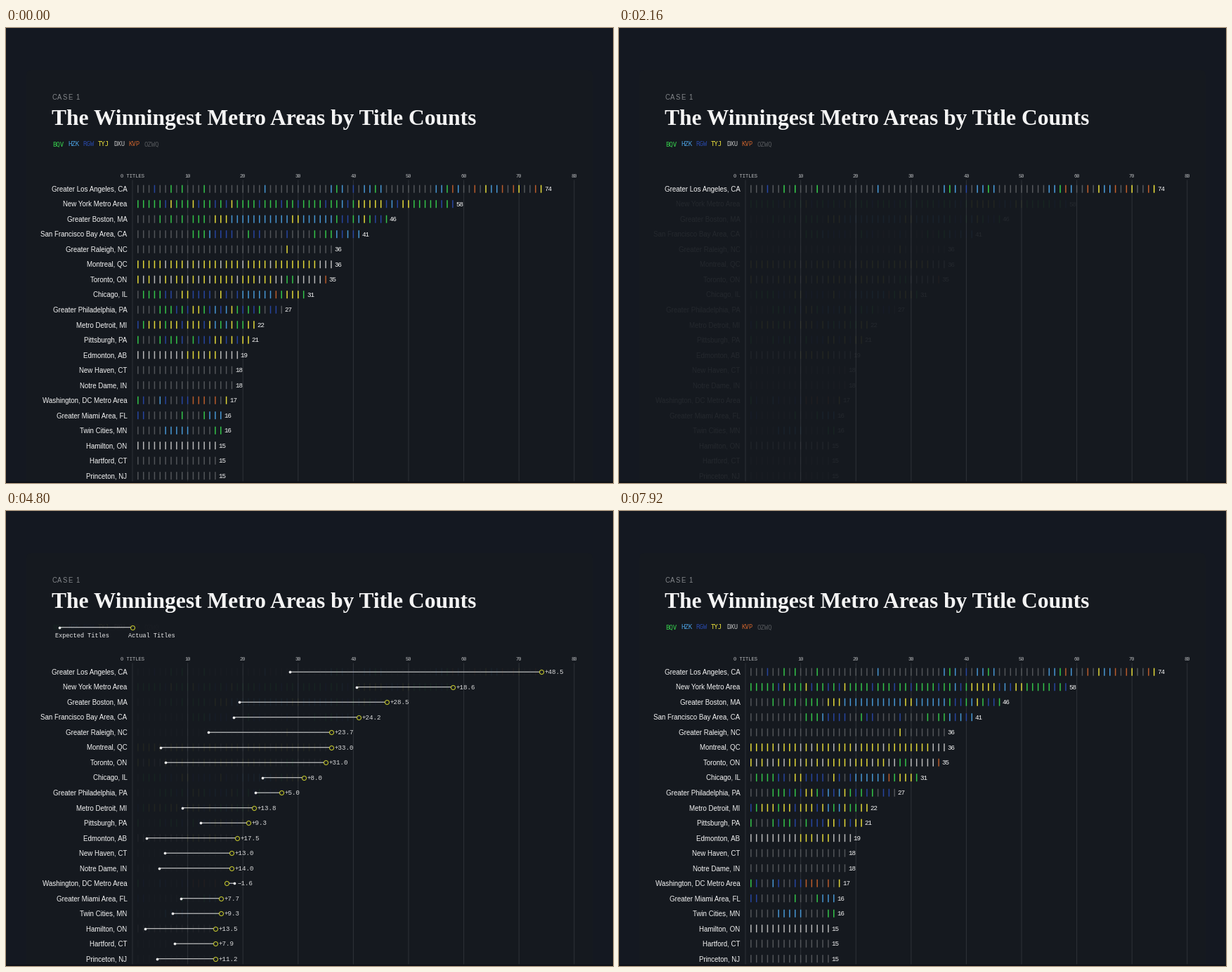
These frames come from a looping animation (864 px wide and 648 px high, 8000 ms). A matplotlib script:

```python
import matplotlib.pyplot as plt
from matplotlib.animation import FuncAnimation
from matplotlib.collections import LineCollection
from matplotlib.patches import FancyBboxPatch, Rectangle

W, H, DPI = 864, 648, 72
STEP_MS, FRAMES = 80, 100
X0, UNIT, Y0, ROW_H, SHOWN = 180, 7.86, 229.2, 21.5, 20
OUTER, PANEL, WHITE, YELLOW = "#141821", "#15191f", "#f4f4f4", "#c9cc2e"
SANS, SERIF, MONO = "Liberation Sans", "Liberation Serif", "Liberation Mono"
DIM = 0.06

LEAGUES = {
    "g": ("BQV", "#36cf4c"), "b": ("HZK", "#4a9fe0"), "n": ("RGW", "#2848a8"),
    "y": ("TYJ", "#f0e53a"), "c": ("DXU", "#c2c2c2"), "m": ("KVP", "#c4602c"),
    ".": ("OZWQ", "#55585c"),
}

# name, titles, titles above expectation, league of each title
METROS = [
    ("Greater Los Angeles, CA", 74, 48.5, "...n..g.g...g..........b...........bgb.n"
     ".bbgb.........bbgmb..m.ybbm.my..my"),
    ("New York Metro Area", 58, 18.6, "gggggnygggynggngnyggggngggnggnggggnggbng"
     "yyyyynbnyygggggngn"),
    ("Greater Boston, MA", 46, 28.5, "....g.g.g.ggg.yyybbbbbbbbbbbyybbbbbbgnngbygnng"),
    ("San Francisco Bay Area, CA", 41, 24.2, "..........gggbnnnn..gnn....n....g.ggbnbnb"),
    ("Greater Raleigh, NC", 36, 23.7, "." * 27 + "y" + "." * 8),
    ("Montreal, QC", 36, 33.0, "yyyyycyyycycyyycyyycyyyycyyyyyyyyccc"),
    ("Toronto, ON", 35, 31.0, "ycyccycyycycycyyyycyyycyyccggcccccm"),
    ("Chicago, IL", 31, 8.0, ".ggggnn.yynnnn.yn.nbbbbbbmgyyyg"),
    ("Greater Philadelphia, PA", 27, 5.0, "....gggngnyygnbnbygngng.nn."),
    ("Metro Detroit, MI", 22, 13.8, "ngyyygyynyyynybgbyggyy"),
    ("Pittsburgh, PA", 21, 9.3, "g...gnggn.gnnnyynynyy"),
    ("Edmonton, AB", 19, 17.5, "cccccccccyyycyycccc"),
    ("New Haven, CT", 18, 13.0, "." * 18),
    ("Notre Dame, IN", 18, 14.0, "." * 18),
    ("Washington, DC Metro Area", 17, -1.6, "gn..bn..nnmmm.m.y"),
    ("Greater Miami Area, FL", 16, 7.7, "nn......g...gbbb"),
    ("Twin Cities, MN", 16, 9.32, ".....bbbbb....gg"),
    ("Hamilton, ON", 15, 13.5, "c" * 15),
    ("Hartford, CT", 15, 7.9, "." * 15),
    ("Princeton, NJ", 15, 11.2, "." * 15),
    ("Tuscaloosa, AL", 15, 11.1, ""),
    ("Green Bay, WI", 14, 11.4, ""),
    ("Austin, TX", 13, 9.0, ""),
    ("Winnipeg, MB", 10, 8.5, ""),
    ("Ottawa, ON", 10, 8.3, ""),
]
BY_MARGIN = sorted(METROS, key=lambda metro: -metro[2])[:SHOWN]

# Each track: (start ms, duration ms, value reached)
CROWD = [(0, 240, 0), (800, 240, 1), (1620, 160, 0), (2120, 360, 1), (2960, 160, 0),
         (3840, 160, 1), (6000, 280, 0), (7020, 500, 1)]
MORPH = [(340, 320, 1), (1760, 320, 0), (3280, 320, 1), (4720, 320, 0),
         (5040, 320, 1), (6340, 440, 0)]
SORT = [(340, 0, 1), (1360, 160, 0.9), (1520, 120, 1), (1800, 0, 0), (3280, 0, 1),
        (4320, 330, 0), (5440, 400, 1), (6330, 0, 0)]


def ease(u):
    return 4 * u ** 3 if u < 0.5 else 1 - 4 * (1 - u) ** 3


def lerp(a, b, u):
    return a + (b - a) * u


def track(segments, t, value):
    for start, length, goal in segments:
        if t >= start + length:
            value = goal
        elif t > start:
            return lerp(value, goal, ease((t - start) / length))
    return value


def x_of(titles):
    return X0 + UNIT * titles


def y_of(rank):
    return Y0 + ROW_H * rank


fig = plt.figure(figsize=(W / DPI, H / DPI), dpi=DPI, facecolor=OUTER)
ax = fig.add_axes([0, 0, 1, 1])
ax.set(xlim=(0, W), ylim=(H, 0))
ax.axis("off")


def write(x, y, text, size, font=MONO, color=WHITE, **kw):
    return ax.text(x, y, text, fontsize=size, family=font, color=color,
                   va="baseline", **kw)


def marker(x, y, size, face, edge, **kw):
    return ax.plot([x], [y], "o", ms=size, mfc=face, mec=edge, mew=1.1,
                   snap=False, **kw)[0]


def draw_dumbbell(x1, x2, y):
    line = ax.plot([x1, x2], [y, y], color="#e0e0e0", lw=1.1, snap=False, zorder=3)[0]
    dot = marker(x1, y, 2.6, WHITE, WHITE, zorder=4)
    ring = marker(x2, y, 6, PANEL, YELLOW, zorder=5)
    return line, dot, ring


class Row:
    def __init__(self, rank, metro):
        name, self.titles, margin, leagues = metro
        self.lead = rank == 0
        self.y_titles = y_of(rank) if rank < SHOWN else None
        self.y_margin = y_of(BY_MARGIN.index(metro)) if metro in BY_MARGIN else None
        self.x1, self.x2 = x_of(self.titles - margin), x_of(self.titles)
        self.margin_text = f"{margin:+.1f}".replace("-", "\u2212")
        y = y_of(rank)
        self.name = write(172.5, y, name, 9.75, SANS, ha="right", clip_on=True)
        self.name.set_clip_path(name_area)
        self.label = write(0, y, "", 9.1)
        self.line, self.dot, self.ring = draw_dumbbell(self.x1, self.x2, y)
        xs = [x_of(i + 1) for i in range(len(leagues))]
        self.ticks = LineCollection([[(x, y - 5.5), (x, y + 5.5)] for x in xs],
                                    colors=[LEAGUES[k][1] for k in leagues],
                                    linewidths=1.5, snap=False, zorder=3)
        ax.add_collection(self.ticks)

    def update(self, crowd, morph, sort):
        show = 1 if self.lead else lerp(DIM, 1, crowd)
        name_x, x1, x2, line_x1 = 172.5, self.x1, self.x2, self.x1
        if self.y_titles is None:
            show *= sort
            y = lerp(y_of(SHOWN - 1), self.y_margin, sort)
            line_y = self.y_margin
            line_x1 = lerp(x2, x1, sort)
        elif self.y_margin is None:
            show *= (1 - sort) ** 1.5
            y = line_y = self.y_titles
            name_x -= 96 * sort
            x1, x2 = lerp(x1, X0, sort), lerp(x2, X0, sort)
            line_x1 = x1
        else:
            y = line_y = lerp(self.y_titles, self.y_margin, sort)
        x1, line_x1 = lerp(x2, x1, morph), lerp(x2, line_x1, morph)

        self.name.set_position((name_x, y + 3.4))
        self.name.set_alpha(show)
        bars = morph < 0.5
        self.label.set_text(str(self.titles) if bars else self.margin_text)
        label_x = x2 + 4.5 if bars else max(x1, x2) + 4.5
        self.label.set_position((label_x, line_y + 3.2))
        self.label.set_alpha(show * abs(2 * morph - 1))

        self.line.set_data([line_x1, x2], [line_y, line_y])
        self.dot.set_data([x1], [y])
        self.ring.set_data([x2], [y])
        for artist in (self.line, self.dot, self.ring):
            artist.set_alpha(show * morph)
            artist.set_visible(morph > 0)
        glow = lerp(1, 0.94, crowd) if self.lead else 0.94 * (1 - sort)
        self.ticks.set_alpha(show * glow * (1 - morph))
        self.ticks.set_visible(morph < 1)


ax.add_patch(FancyBboxPatch((36, 67), 792, 600, boxstyle="round,pad=7",
                            fc=PANEL, lw=0, zorder=0))
ax.add_patch(Rectangle((0, 645.5), W, 3, color="#0e1017", lw=0, zorder=6))
name_area = Rectangle((37, 0), W, H, transform=ax.transData)

for i, char in enumerate("CASE"):
    write(65 + 7.9 * i, 102, char, 9.5, SANS, "#85888c")
write(99.5, 102, "1", 9.5, SANS, "#85888c")
write(65, 138, "The Winningest Metro Areas by Title Counts", 31.5, SERIF,
      weight="bold")

for k in range(9):
    x = x_of(10 * k)
    ax.plot([x, x], [217, 645], color="#2e3238", lw=1, snap=False, zorder=1)
    write(x, 213, str(10 * k) if k else "0 TITLES", 7.1, color="#b8babc", ha="center")

league_legend = [write(66.5 + 21.6 * i, 168.5, text, 9, "DejaVu Sans Mono", color)
                 for i, (text, color) in enumerate(LEAGUES.values())]
margin_legend = [*draw_dumbbell(76, 180, 165.7),
                 write(70, 180, "Expected Titles", 8.65),
                 write(174, 180, "Actual Titles", 8.65)]
rows = [Row(rank, metro) for rank, metro in enumerate(METROS)]


def update(frame):
    t = frame * STEP_MS
    crowd, morph, sort = track(CROWD, t, 1), track(MORPH, t, 0), track(SORT, t, 0)
    for row in rows:
        row.update(crowd, morph, sort)
    for artist in league_legend:
        artist.set_alpha(1 - morph)
    for artist in margin_legend:
        artist.set_alpha(morph)
    return []


anim = FuncAnimation(fig, update, frames=FRAMES, interval=STEP_MS,
                     repeat=True, repeat_delay=0, blit=False)
plt.show()
```
